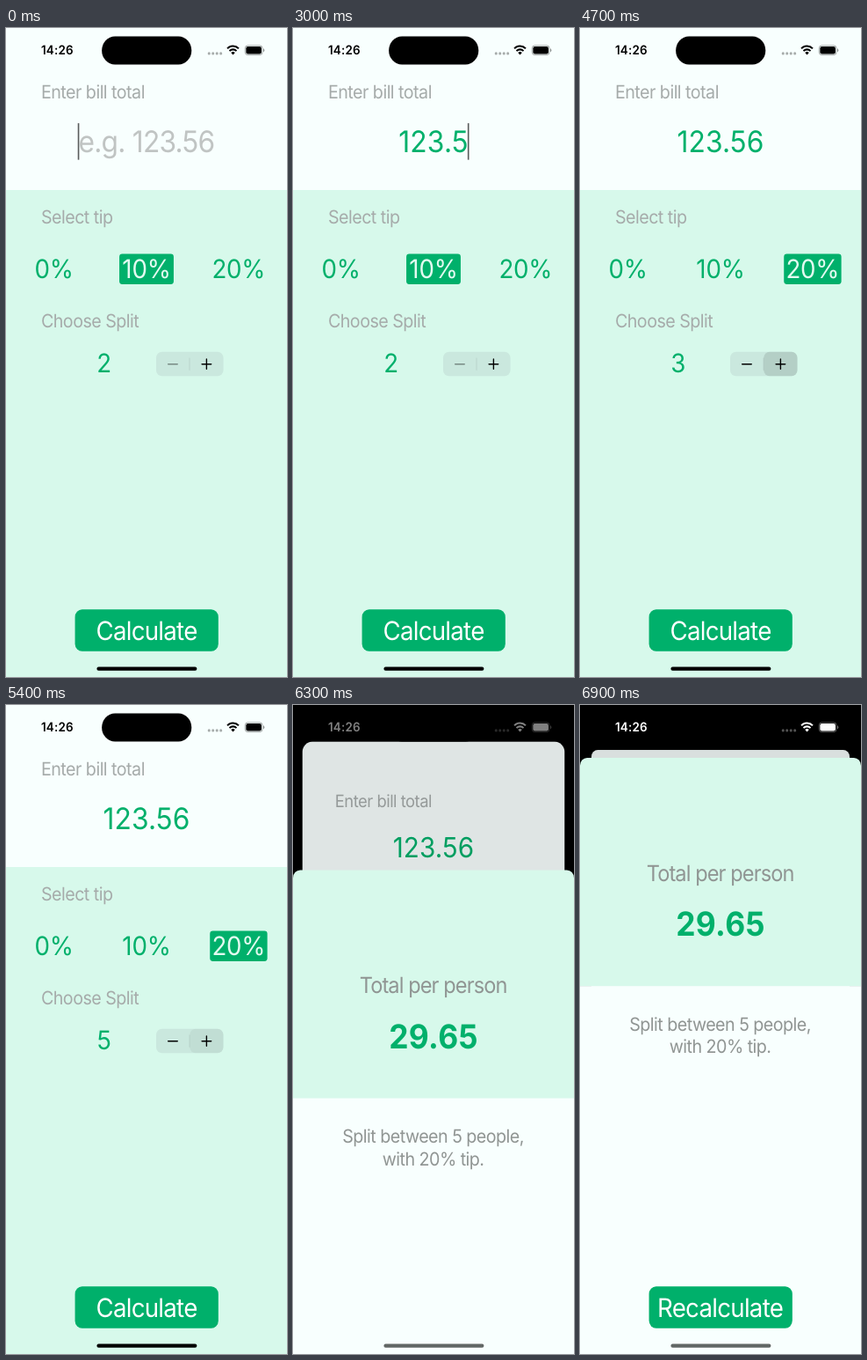
An HTML page for the animation above (8000 ms loop, 320 by 737 pixels).

```html
<!DOCTYPE html>
<html lang="en">
<head>
<meta charset="utf-8">
<title>Tip calculator</title>
<style>
  html, body { margin: 0; width: 100%; height: 100%; overflow: hidden; background: #000; }
  svg { display: block; width: 100vw; height: 100vh; }
  text { font-family: Inter, Roboto, sans-serif; font-optical-sizing: none;
         letter-spacing: -.027em; text-rendering: geometricPrecision; }
  .label { font-size: 24.2px; fill: #a6abaa; }
  .note { font-size: 24.2px; fill: #909593; }
  .title { font-size: 29px; letter-spacing: -.039em; fill: #909593; }
  .field { font-size: 39px; letter-spacing: .004em; }
  .field.hint { letter-spacing: -.025em; }
  .big { font-size: 34px; }
  .tips text { letter-spacing: -.008em; }
  .total { font-size: 43.5px; font-weight: 700; letter-spacing: .009em; }
  .clock { font-size: 16.5px; font-weight: 600; letter-spacing: .015em; }
  .mid { text-anchor: middle; }
  .green { fill: #00b06b; }
  .white { fill: #fff; }
  .paper { fill: #f8fffe; }
  .mint { fill: #d7f9eb; }
</style>
</head>
<body>
<!-- Laid out in phone points; the stage squeezes the whole screen. -->
<svg viewBox="0 0 393 852" preserveAspectRatio="none">
  <clipPath id="card"><rect id="cardShape" width="393" height="852"/></clipPath>
  <rect width="393" height="852"/>

  <g id="back" clip-path="url(#card)">
    <rect class="paper" width="393" height="213"/>
    <rect class="mint" y="212.7" width="393" height="640"/>

    <text class="label" x="49" y="92.7">Enter bill total</text>
    <text id="bill" x="196.5" y="163.2"></text>
    <rect id="caret" y="125" width="2" height="48" fill="#5a5c5c"/>

    <text class="label" x="49" y="257.2">Select tip</text>
    <rect id="tipBox" y="296.5" height="40" rx="4"/>
    <g class="big mid tips">
      <text class="green" x="67" y="328.3">0%</text>
      <text id="tip10" x="196.5" y="328.3">10%</text>
      <text id="tip20" x="325.3" y="328.3">20%</text>
    </g>

    <text class="label" x="49" y="393.3">Choose Split</text>
    <text class="big mid green" id="split" x="136.8" y="451.5"></text>
    <rect x="210" y="425" width="94" height="32" rx="8" fill="#767680" fill-opacity=".13"/>
    <rect id="press" x="257" y="425" width="47" height="32" rx="8" fill-opacity=".11"/>
    <g stroke="#000" stroke-width="1.7" stroke-linecap="round">
      <path d="M256.7 433.5v15.5" stroke-width="1" stroke-opacity=".1"/>
      <path id="minus" d="M226.8 441.2h13"/>
      <path d="M274 441.2h13M280.5 434.7v13"/>
    </g>

    <rect class="green" x="96.5" y="763.3" width="200.5" height="55" rx="10"/>
    <text class="big mid white" id="calculate" x="196.5" y="803.5">Calculate</text>
    <rect id="dim" width="393" height="852"/>
  </g>

  <rect x="134" y="11" width="125.5" height="37" rx="18.5"/>

  <g id="status" fill="currentColor" stroke="none">
    <text class="clock" x="49" y="35.2">14:26</text>
    <g opacity=".32">
      <circle cx="284" cy="33.5" r="1.9"/><circle cx="289.5" cy="33.5" r="1.9"/>
      <circle cx="295" cy="33.5" r="1.9"/><circle cx="300.5" cy="33.5" r="1.9"/>
    </g>
    <path d="M317.5 35.3l-2.8-2.8a4 4 0 0 1 5.6 0z"/>
    <path d="M312.6 30.2a7 7 0 0 1 9.8 0M309.6 27a11.2 11.2 0 0 1 15.8 0"
          fill="none" stroke="currentColor" stroke-width="2.4"/>
    <rect x="334.3" y="23" width="24.4" height="12.4" rx="3.8" fill="none" stroke="currentColor" stroke-opacity=".4"/>
    <rect x="335.7" y="24.4" width="21.6" height="9.6" rx="2.6"/>
    <path d="M360 27v4.4a2.4 2.4 0 0 0 0-4.4z" opacity=".45"/>
  </g>

  <g id="sheet">
    <path class="mint" d="M0 300V10A10 10 0 0 1 10 0H383A10 10 0 0 1 393 10V300z"/>
    <rect class="paper" y="299.5" width="393" height="560"/>
    <g class="mid">
      <text class="title" x="196" y="161.3">Total per person</text>
      <text class="total green" x="196.5" y="234">29.65</text>
      <text class="note" x="196" y="357.8">Split between 5 people,</text>
      <text class="note" x="196" y="387.8">with 20% tip.</text>
      <rect class="green" x="96.5" y="693.8" width="200.5" height="55" rx="10"/>
      <text class="big white" x="196" y="734">Recalculate</text>
    </g>
  </g>

  <rect id="home" x="127" y="838.7" width="140" height="5" rx="2.5"/>
</svg>
<script>
const LOOP = 8000, STEP = 100, CENTER = 196.5;
const GREEN = '#00b06b', PALE = '#e2faf0';
const $ = id => document.getElementById(id);
const set = (id, attrs) => {
  for (const name in attrs) $(id).setAttribute(name, attrs[name]);
};
const clamp = x => Math.min(1, Math.max(0, x));
const ramp = (t, from, to) => clamp((t - from) / (to - from));

const typed = [1100, 1400, 1700, 2600, 3000, 3200];
const taps = [4700, 5000, 5300];
const countPast = (times, t) => times.filter(x => t >= x).length;

// Share of the way the sheet has risen: a critically damped spring.
function sheetProgress(t) {
  const x = Math.max(0, t - 6132) * 0.0183;
  return 1 - (1 + x) * Math.exp(-x);
}

function drawBill(t) {
  const n = countPast(typed, t), bill = $('bill');
  bill.textContent = n ? '123.56'.slice(0, n) : 'e.g. 123.56';
  set('bill', { class: n ? 'field mid' : 'field hint mid', fill: n ? GREEN : '#c0c4c3' });
  const half = bill.getComputedTextLength() / 2;
  const blink = t < 600 ? 1 - ramp(t, 200, 400) : ramp(t, 500, 800);
  set('caret', { x: n ? CENTER + half - 1 : CENTER - half - 1, opacity: t >= 4200 ? 0 : blink });
}

function drawTips(t, p) {
  const twenty = t >= 4200;
  set('tipBox', {
    x: twenty ? 285.2 : 158.5,
    width: twenty ? 80.3 : 76,
    opacity: twenty ? 0.4 + 0.6 * ramp(t, 4100, 4400) : 1
  });
  $('tipBox').style.fill = `color-mix(in srgb, ${GREEN}, #999 ${p * 100}%)`;
  set('tip10', { fill: twenty ? GREEN : PALE });
  set('tip20', { fill: twenty ? PALE : GREEN, opacity: t === 4100 ? 0.22 : 1 });
}

function drawSplit(t) {
  const n = countPast(taps, t), since = n ? t - taps[n - 1] : LOOP;
  $('split').textContent = 2 + n;
  set('minus', { opacity: n ? 1 : 0.4 });
  set('press', { opacity: since < STEP ? 1 : since < 700 && (n === 3 || since < 200) ? 0.4 : 0 });
}

function drawSheet(t, p) {
  set('back', { transform: `translate(${CENTER * 0.081 * p} ${59 * p}) scale(${1 - 0.081 * p})` });
  set('cardShape', { rx: p ? 10 + 30 * (1 - p) : 0 });
  set('dim', { opacity: 0.125 * p });
  set('calculate', { opacity: t === 6000 ? 0.25 : t === 6100 ? 0.5 : 1 });
  set('sheet', { transform: `translate(0 ${852 - 782.6 * p})` });
  const level = 255 * ramp(t, 6200, 6400);
  $('status').style.color = `rgb(${level} ${level} ${level})`;
  set('home', { fill: p ? '#626765' : '#000' });
}

function frame() {
  const t = Math.floor(performance.now() % LOOP / STEP) * STEP;
  const p = sheetProgress(t);
  drawBill(t);
  drawTips(t, p);
  drawSplit(t);
  drawSheet(t, p);
  requestAnimationFrame(frame);
}
frame();
</script>
</body>
</html>
```
